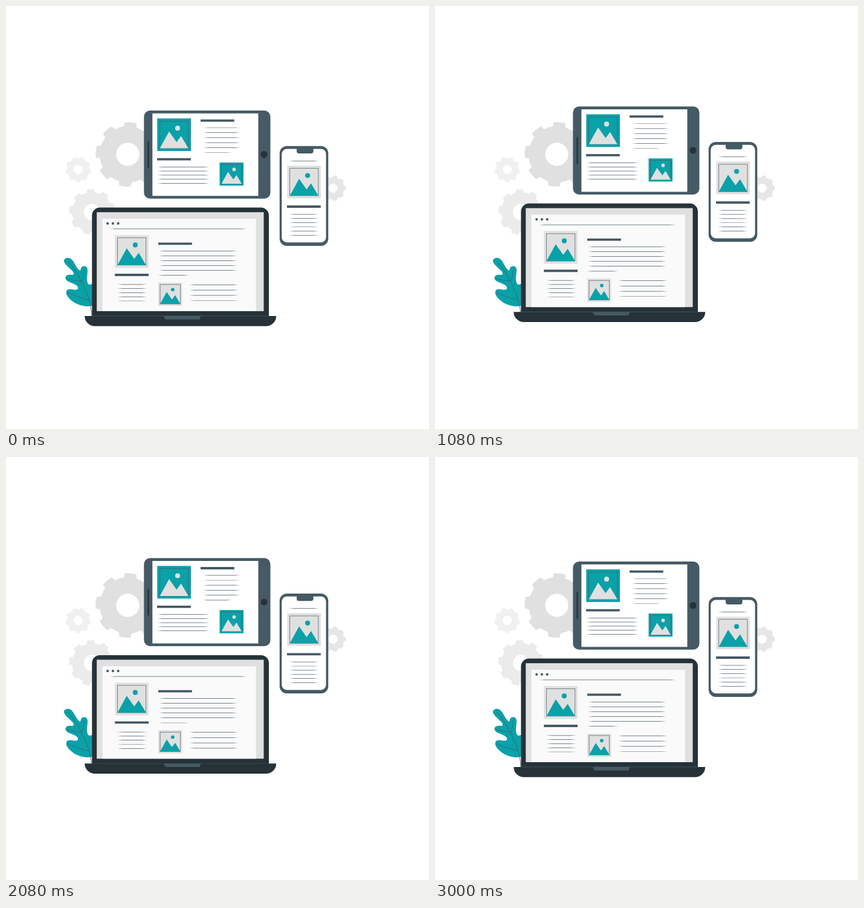
An HTML page with a canvas that plays this animation: 700 px wide and 700 px high, repeating every 3040 ms.

```html
<!DOCTYPE html>
<html lang="en">
<head>
<meta charset="utf-8">
<title>Responsive devices</title>
<style>
html, body { margin: 0; width: 100%; height: 100%; overflow: hidden; background: #fff; }
canvas { display: block; width: 700px; height: 700px; }
</style>
</head>
<body>
<canvas id="stage"></canvas>
<script>
const LOOP = 3040, STEPS = 73, FPS = 24, PERIOD = 3, RISE = 28 / 3;
const DARK = '#263238', SLATE = '#455a64', TEAL = '#0aa1a9';
const GREY = '#e0e0e0', PAPER = '#fafafa', WHITE = '#fff';
const SMALL = 0.71;

const canvas = document.getElementById('stage');
const scale = window.devicePixelRatio || 1;
canvas.width = canvas.height = 700 * scale;
const ctx = canvas.getContext('2d');

function rect(x, y, w, h, color, radii = 0) {
  ctx.fillStyle = color;
  ctx.beginPath();
  ctx.roundRect(x, y, w, h, radii);
  ctx.fill();
}

function poly(points, color) {
  ctx.fillStyle = color;
  ctx.beginPath();
  points.forEach(([x, y]) => ctx.lineTo(x, y));
  ctx.closePath();
  ctx.fill();
}

function disc(x, y, r, color) {
  ctx.fillStyle = color;
  ctx.beginPath();
  ctx.arc(x, y, r, 0, Math.PI * 2);
  ctx.fill();
}

function strokePath(d, color, width) {
  ctx.strokeStyle = color;
  ctx.lineWidth = width;
  ctx.lineCap = 'round';
  ctx.stroke(new Path2D(d));
}

// Thin text rule with tapered ends
function rule(x, y, w) {
  const h = 0.34, t = 9;
  poly([[x, y], [x + t, y - h], [x + w - t, y - h], [x + w, y], [x + w - t, y + h], [x + t, y + h]], SLATE);
}

function rules(x, y, w, gap, count) {
  for (let i = 0; i < count; i++) rule(x, y + i * gap, w);
}

function heading(x, y) {
  rect(x, y - 1.9, 55.8, 3.8, SLATE);
}

// Teeth, root and hole keep the same proportions at every size
function gear(x, y, r, teeth, turn, color) {
  const step = Math.PI * 2 / teeth;
  const tip = step * 0.23, foot = step * 0.29;
  ctx.fillStyle = color;
  ctx.beginPath();
  for (let i = 0; i < teeth; i++) {
    const mid = (turn - 90) * Math.PI / 180 + i * step;
    ctx.arc(x, y, r * 0.875, mid - step + foot, mid - foot);
    ctx.arc(x, y, r, mid - tip, mid + tip);
  }
  ctx.closePath();
  ctx.moveTo(x + r * 0.36, y);
  ctx.arc(x, y, r * 0.36, 0, Math.PI * 2);
  ctx.fill('evenodd');
}

function picture(x, y, size, back, front) {
  ctx.save();
  ctx.translate(x, y);
  ctx.scale(size, size);
  rect(0, 0, 55.7, 54, back);
  ctx.strokeStyle = SLATE;
  ctx.lineWidth = 0.7 / size;
  ctx.strokeRect(4.3, 4.4, 47.2, 45.2);
  poly([[4.3, 49.6], [19.6, 21.7], [32, 39.3], [39.4, 29.3], [51.5, 49.6]], front);
  disc(33.7, 16.2, 4.1, front);
  ctx.restore();
}

function leaf() {
  ctx.fillStyle = TEAL;
  ctx.fill(new Path2D(`M96 423 C95 418 101 415.5 106 417.5 C113 421 115 432 121 437
    C125 440 122 432 127 431 C132 429.5 135 432.5 135 437 C135 446 132 453 136 460
    Q139 463 148 457 V494 C140 499 124 498 112 490 C105 485 98 478 100 472
    C103 464 115 473 119 468 C121 462 110 459 103 456 C97 453 97 446 103 445
    C108 444 112 447 112 442 C111 437 98 430 96 423 Z`));
  strokePath('M103 423 C116 437 126 457 132 471 Q141 491 142 513', SLATE, 0.8);
  strokePath('M129 437 Q129 447 126 455 Q111 455 99 450 M102 474.5 Q119 482 138 487', SLATE, 0.7);
}

function backdrop() {
  gear(201.5, 245.5, 53.3, 8, 5, GREY);
  gear(142.5, 341, 37.8, 9, -4, '#ebebeb');
  gear(119.5, 270.5, 21, 9, 20, '#f0f0f0');
  gear(541.3, 301.5, 21, 9, 10, '#e6e6e6');
  leaf();
}

function tablet() {
  rect(228.3, 173, 209.2, 145.7, SLATE, 10);
  rect(242.3, 177.8, 175.2, 136.5, WHITE);
  strokePath('M235.5 225 V267', DARK, 2.3);
  disc(427, 245.7, 5.6, DARK);
  picture(250.3, 186, 1, TEAL, GREY);
  heading(322, 189.7);
  rules(326, 201.5, 61.5, 8.2, 5);
  rule(325, 242.5, 49);
  heading(250, 253.6);
  rules(250, 266.4, 87, 6.75, 5);
  picture(353.5, 259, SMALL, TEAL, GREY);
}

function phone() {
  rect(452.8, 231.8, 80.5, 165.1, SLATE, 12);
  rect(456.3, 236.5, 73.3, 154.8, WHITE, 8.5);
  rect(481, 235, 27.7, 9, SLATE, [0, 0, 4, 4]);
  rule(468, 256.4, 50);
  picture(465.4, 264.3, 1, GREY, TEAL);
  heading(465, 332);
  rules(468, 344.8, 49.5, 6.9, 6);
}

function laptop() {
  rect(142.3, 333.6, 292.7, 180, DARK, [13, 13, 0, 0]);
  rect(150.2, 341.3, 276.3, 163.7, GREY);
  rect(159.4, 352, 254.3, 153, PAPER);
  rect(130.2, 513, 317, 16.7, DARK, [0, 0, 16.7, 16.7]);
  rect(142.3, 512.6, 292.7, 0.6, SLATE);
  poly([[260.5, 513], [322.7, 513], [320, 518.7], [264, 518.7]], SLATE);
  for (let i = 0; i < 3; i++) disc(168.2 + i * 8.7, 359.8, 2.1, SLATE);
  rule(172, 368.9, 226);
  picture(180.2, 379.2, 1, GREY, TEAL);
  heading(180.2, 445);
  rules(184, 460.8, 49.5, 6.8, 5);
  heading(252, 393.3);
  rules(253, 405.4, 129.5, 8, 5);
  rule(251, 445.7, 52);
  picture(252, 457.8, SMALL, GREY, TEAL);
  rules(303, 461.4, 81.5, 8.7, 4);
}

function draw(ms) {
  const frame = Math.floor(((ms + 4) % LOOP) / LOOP * STEPS);
  const phase = frame / FPS / PERIOD;
  const lift = RISE * (1 - Math.abs(1 - 2 * phase));
  ctx.setTransform(scale, 0, 0, scale, 0, 0);
  rect(0, 0, 700, 700, WHITE);
  backdrop();
  ctx.translate(0, -lift);
  tablet();
  phone();
  laptop();
}

const start = performance.now();
function tick() {
  draw(performance.now() - start);
  requestAnimationFrame(tick);
}
tick();
</script>
</body>
</html>
```
